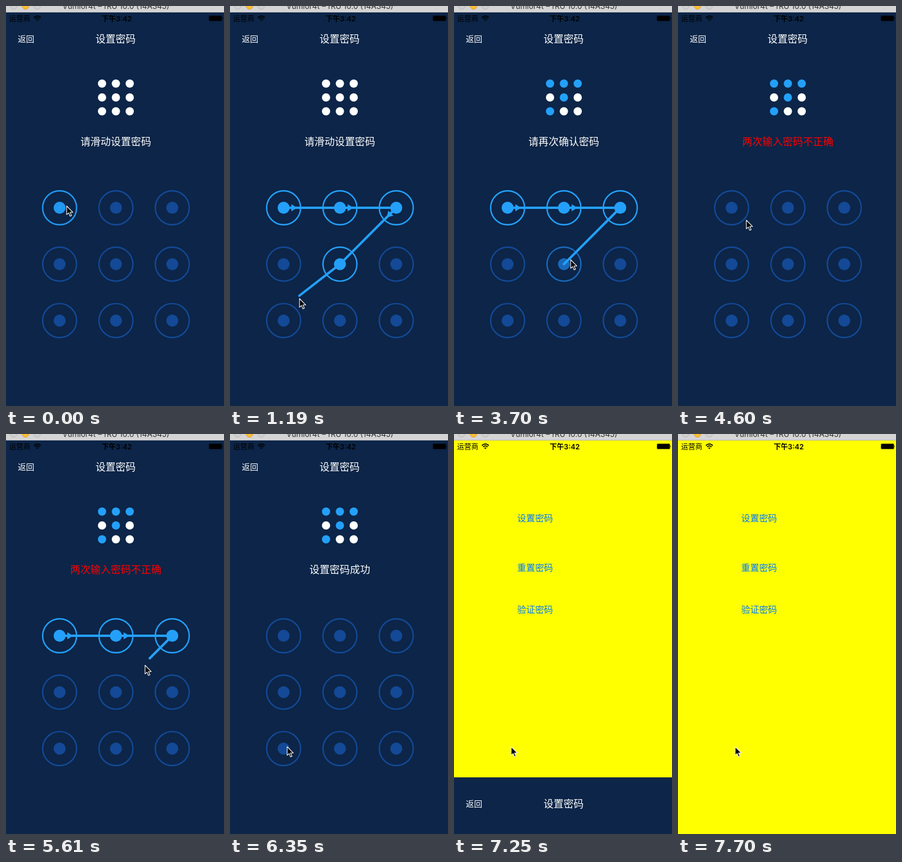
Recreate the animation shown at these times as an HTML page. Size 370 by 678 pixels, loop 8 s.

```html
<!DOCTYPE html>
<html lang="zh-CN">
<head>
<meta charset="utf-8">
<title>手势密码</title>
<style>
  html, body { margin: 0; width: 100%; height: 100%; overflow: hidden; background: #ff0; }
  svg { display: block; }
  text { font-family: Inter, "Noto Sans CJK SC", "Noto Sans CJK", sans-serif; }
  .mid { text-anchor: middle; }
</style>
</head>
<body>
<svg id="stage" width="370" height="678" viewBox="0 0 370 678">
  <rect width="370" height="678" fill="#ff0"/>
  <g fill="#007aff" font-size="15.2">
    <text x="107.3" y="147.5">设置密码</text>
    <text x="107.3" y="231.5">重置密码</text>
    <text x="107.3" y="302.5">验证密码</text>
  </g>

  <g id="page">
    <rect y="11" width="370" height="667" fill="#0c2548"/>
    <g fill="#fff">
      <text x="20" y="61" font-size="14">返回</text>
      <text class="mid" x="186" y="62" font-size="17">设置密码</text>
    </g>
    <g id="preview"></g>
    <text id="message" class="mid" x="186.3" y="236" font-size="17.2"></text>
    <g id="pad"></g>
    <polyline id="line" fill="none" stroke="#24a0fa" stroke-width="4"
      stroke-linecap="round" stroke-linejoin="round"/>
    <g id="arrows" fill="#24a0fa"></g>
  </g>

  <g font-size="12">
    <text x="5.3" y="25.5">运营商</text>
    <text class="mid" x="188" y="25.5" font-weight="600">下午3:42</text>
    <g fill="none" stroke="#000" stroke-width="1.7">
      <path d="M47.3 19.6Q53.2 14.2 59.1 19.6M49.4 21.9Q53.2 18.4 57 21.9"/>
      <path d="M53.2 25.6l-2-2.1q2-1.7 4 0z" fill="#000" stroke="none"/>
    </g>
    <rect x="344.5" y="16.5" width="22" height="9" rx="1.5" fill="none" stroke="#000" stroke-width=".5"/>
    <rect x="345" y="17" width="21" height="8" rx=".8"/>
    <path d="M367.4 19.2q1.8 1.8 0 3.6z"/>
  </g>

  <rect width="370" height="11" fill="#d5d4d5"/>
  <rect y="10" width="370" height="1" fill="#b5b3b5"/>
  <g fill="#d0cfd0" stroke="#b9b8b9">
    <circle cx="13" r="5.5"/>
    <circle cx="33" r="5.5" fill="#fdbe2f" stroke="#dca032"/>
    <circle cx="53" r="5.5"/>
  </g>
  <text class="mid" x="186.5" y="5" font-size="13" fill="#333">Vumlor4t – fRU 10.0 (14A345)</text>

  <path id="cursor" d="M0 0V14.6L3.4 11.6L5.8 17.2L8.2 16.2L5.8 10.7H10.4Z"
    stroke="#fff" stroke-width="1.1" stroke-linejoin="round"/>
</svg>

<script>
const LOOP = 8000, TICK = 148.15, LAST_TICK = 52, SLIDE_TICK = 48, GLIDE_TICKS = 4;
const DIM = [19, 73, 150], LIT = [36, 160, 250];
const CODE = [0, 1, 2, 4, 6];

// from/end in ticks, rate in nodes per tick, lead of the cursor over the line in nodes
const strokes = [
  { nodes: CODE, from: 0, end: 11, rate: 0.465, lead: 0.06, reply: "请再次确认密码" },
  { nodes: CODE.slice(0, 4), from: 18, end: 27, rate: 0.421, lead: 0, reply: "两次输入密码不正确", color: "#f00" },
  { nodes: CODE, from: 32, end: 43, rate: 0.4, lead: 0.15, reply: "设置密码成功" }
];

const $ = id => document.getElementById(id);
const clamp = v => Math.max(0, Math.min(1, v));
const lerp = (a, b, t) => a + (b - a) * t;
const gridPoint = (i, x, y, pitch) => [x + i % 3 * pitch, y + Math.floor(i / 3) * pitch];
const nodeAt = i => gridPoint(i, 91, 342, 95.6);
const mix = t => `rgb(${DIM.map((c, i) => Math.round(lerp(c, LIT[i], t)))})`;

function make(parent, tag, attrs) {
  const el = document.createElementNS("http://www.w3.org/2000/svg", tag);
  for (const name in attrs) el.setAttribute(name, attrs[name]);
  return parent.appendChild(el);
}

const dots = [], rings = [], cores = [];
for (let i = 0; i < 9; i++) {
  const [cx, cy] = nodeAt(i), [x, y] = gridPoint(i, 163, 131.5, 23.5);
  dots.push(make($("preview"), "circle", { cx: x, cy: y, r: 7 }));
  rings.push(make($("pad"), "circle", { cx, cy, r: 28.8, fill: "none", "stroke-width": 2.4 }));
  cores.push(make($("pad"), "circle", { cx, cy, r: 10.2 }));
}
const arrows = CODE.slice(1).map((next, i) => {
  const [x, y] = nodeAt(CODE[i]), [nx, ny] = nodeAt(next);
  const angle = Math.atan2(ny - y, nx - x) * 180 / Math.PI;
  return make($("arrows"), "path",
    { d: "M13-6L23 0L13 6Z", transform: `translate(${x} ${y}) rotate(${angle})` });
});

const progress = (stroke, k) => (k - stroke.from) * stroke.rate;

// Finger position after s nodes; the last leg arcs slightly upwards.
function hand({ nodes }, s) {
  s = Math.min(s, nodes.length - 1);
  const leg = Math.min(Math.floor(s), nodes.length - 2);
  const [ax, ay] = nodeAt(nodes[leg]), [bx, by] = nodeAt(nodes[leg + 1]);
  const arc = 20 * Math.sin(Math.PI * Math.max(0, s - 3));
  return [lerp(ax, bx, s - leg), lerp(ay, by, s - leg) - arc];
}

function cursorAt(k) {
  const index = strokes.filter(s => s.from <= k).length - 1;
  const stroke = strokes[index], next = strokes[index + 1];
  let [x, y] = hand(stroke, progress(stroke, k) + stroke.lead);
  if (next && k > next.from - GLIDE_TICKS) {
    const t = 1 - (next.from - k) / GLIDE_TICKS;
    const [nx, ny] = hand(next, next.lead);
    x = lerp(x, nx, t) - 22 * Math.sin(Math.PI * t);
    y = lerp(y, ny, t);
  }
  return [x + 6, y - 3];
}

function drawPad(k) {
  const stroke = strokes.find(s => k >= s.from && k < s.end);
  const s = stroke ? progress(stroke, k) : 0;
  const lit = stroke ? stroke.nodes.map((_, i) => clamp(0.9 + (s - i) * 10)) : [];
  rings.forEach((ring, i) => {
    const color = mix(stroke && lit[stroke.nodes.indexOf(i)] || 0);
    ring.setAttribute("stroke", color);
    cores[i].setAttribute("fill", color);
  });
  arrows.forEach((arrow, i) =>
    arrow.setAttribute("visibility", lit[i + 1] === 1 ? "visible" : "hidden"));

  let points = [];
  if (stroke) {
    const reached = stroke.nodes.filter((_, i) => lit[i] > 0).map(nodeAt);
    points = [...reached, hand(stroke, s)];
  }
  $("line").setAttribute("points", points.join(" "));
}

function draw(k) {
  drawPad(k);
  const done = strokes.filter(s => s.end <= k);
  dots.forEach((dot, i) =>
    dot.setAttribute("fill", done.length && CODE.includes(i) ? mix(1) : "#fff"));

  const { reply, color = "#fff" } = done.pop() || { reply: "请滑动设置密码" };
  $("message").textContent = reply;
  $("message").setAttribute("fill", color);

  // critically damped spring
  const u = 0.73 + 2.7 * (k - SLIDE_TICK);
  const drop = k < SLIDE_TICK ? 0 : Math.round(667 * (1 - (1 + u) * Math.exp(-u)));
  $("page").setAttribute("transform", `translate(0 ${drop})`);
  $("cursor").setAttribute("transform", `translate(${cursorAt(k).map(Math.round)})`);
}

const start = performance.now();
let shown = -1;
function frame() {
  const t = (performance.now() - start) % LOOP;
  const k = Math.min(LAST_TICK, Math.floor((t + 20) / TICK));
  if (k !== shown) draw(shown = k);
  requestAnimationFrame(frame);
}
frame();
</script>
</body>
</html>
```
